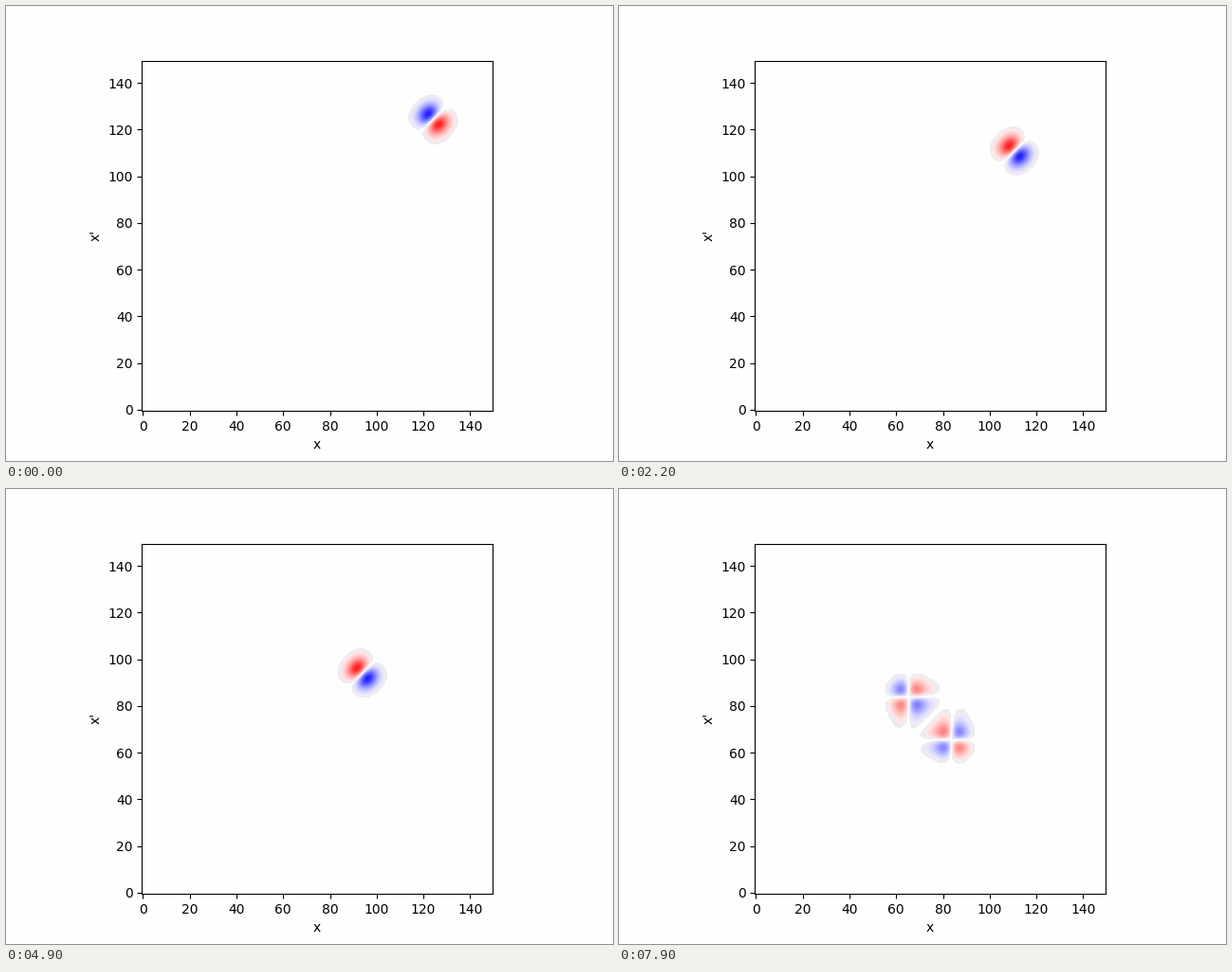
These frames come from a looping animation (640 px wide and 480 px high, 8000 ms). A matplotlib script:

```python
import numpy as np
import matplotlib.pyplot as plt
from matplotlib.animation import FuncAnimation
from matplotlib.colors import ListedColormap

SITES = 150
FRAMES = 80
OMEGA, WIDTH = 0.105, 6.0       # trap frequency and Gaussian trap width
DEPTH = (OMEGA * WIDTH) ** 2
SLOW_FROM = 60
PAPER = "#fefefe"

x = np.arange(SITES)
kinetic = np.eye(SITES) - 0.5 * (np.eye(SITES, k=1) + np.eye(SITES, k=-1))


def well_center(i):
    """Right-hand well: fast approach, then a slow one."""
    return 124.2 - 0.62 * min(i, SLOW_FROM) - 0.155 * max(i - SLOW_FROM, 0)


def orbitals(center):
    """Localised states of the left and right well, levels 0 to 2."""
    mirror = SITES - 1 - center
    trap = sum(np.exp(-(x - c) ** 2 / (2 * WIDTH**2)) for c in (center, mirror))
    _, states = np.linalg.eigh(kinetic - np.diag(DEPTH * trap))
    left, right = [], []
    for n in range(3):
        pair = states[:, 2 * n:2 * n + 2]
        _, turn = np.linalg.eigh(pair.T @ (x[:, None] * pair))
        for side, c, f in zip((left, right), (mirror, center), (pair @ turn).T):
            side.append(f * np.sign(np.sum(f * (x - c) ** n)))
    return left, right


def slater(f, g):
    """Antisymmetric pair state; columns are x, rows are x'."""
    return (np.outer(g, f) - np.outer(f, g)) / np.sqrt(2)


def crossing(i, at, width):
    """Amplitudes of the old and new state around an avoided crossing."""
    d = (i - at) / width
    w = 0.5 * (1 + d / np.hypot(d, 1))
    return np.sqrt(1 - w), np.sqrt(w)


def wave(i):
    left, right = orbitals(well_center(i))
    both_right = slater(right[0], right[1])
    if i < 18:
        return -both_right
    if i < 55:
        return both_right
    split = -slater(left[2], right[0])
    if i < 69:
        a, b = crossing(i, 62, 0.7)
        return a * both_right + b * split
    a, b = crossing(i, 75.5, 0.3)
    return a * split + b * slater(left[1], right[1])


def palette():
    """Blue-white-red with a clean centre and a pale grey rim."""
    v = np.linspace(-1, 1, 512)
    colors = plt.get_cmap("bwr")(np.linspace(0, 1, 512))
    colors[np.abs(v) < 0.08, :3] = (0.937, 0.925, 0.937)
    colors[np.abs(v) < 0.04, :3] = 254 / 255
    return ListedColormap(colors)


fig, ax = plt.subplots(figsize=(6.4, 4.8), dpi=100, facecolor=PAPER)
ax.set_facecolor(PAPER)
start = wave(0)
limit = np.abs(start).max() / 0.88
image = ax.imshow(start, origin="lower", cmap=palette(), vmin=-limit, vmax=limit)
ax.set_xlabel("x")
ax.set_ylabel("x'")


def update(i):
    image.set_data(wave(i))
    return [image]


anim = FuncAnimation(fig, update, frames=FRAMES, interval=100,
                     repeat=True, repeat_delay=0)
plt.show()
```
